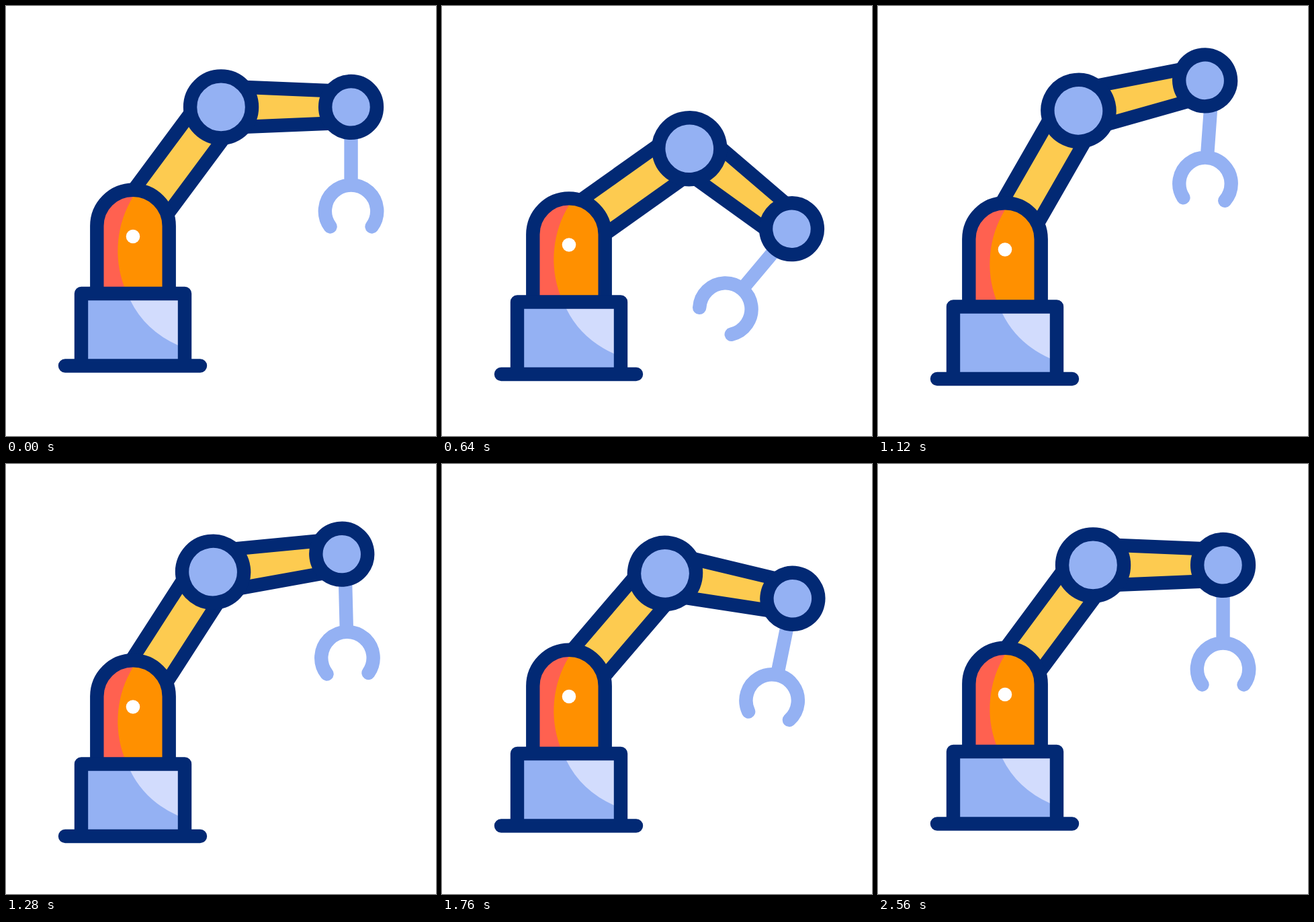
Animation, 640 px wide and 640 px high, one loop 2640 ms. Source, as an HTML page:

```html
<!DOCTYPE html>
<html lang="en">
<head>
<meta charset="utf-8">
<title>Robot arm</title>
<style>
  html, body { margin: 0; width: 100%; height: 100%; overflow: hidden; background: #fff; }
  svg { display: block; width: 100%; height: 100%; }
  .line { stroke: #022974; stroke-width: 20.4; stroke-linejoin: round; stroke-linecap: round; }
  .blue { fill: #94b1f3; }
  .yellow { fill: #fdcb50; }
  .claw { fill: none; stroke: #94b1f3; stroke-width: 20.4; stroke-linecap: round; }
</style>
</head>
<body>
<svg viewBox="0 0 640 640">
  <g id="robot">
    <!-- upper arm: origin at the shoulder, pointing up -->
    <g id="upper">
      <path class="line yellow" d="M-31 0V-219.9H31V0Z"/>
      <!-- forearm: origin at the elbow, pointing right -->
      <g id="fore">
        <g id="claw">
          <path class="claw" d="M0 0V115.5M-31 178A38.7 38.7 0 1 1 31 178"/>
        </g>
        <path class="line yellow" d="M0 -31L193.5 -23V23L0 31Z"/>
        <circle class="line blue" r="46"/>
        <circle class="line blue" cx="193.5" r="38.4"/>
      </g>
    </g>
    <path fill="#ff9000" d="M135.3 428V327.5A53.7 53.7 0 0 1 242.7 327.5V428Z"/>
    <path fill="#ff6150" d="M135.3 428V327.5A53.7 53.7 0 0 1 189 273.8V284A154 154 0 0 0 176 418V428Z"/>
    <path class="line" fill="none" d="M135.3 428V327.5A53.7 53.7 0 0 1 242.7 327.5V428"/>
    <circle cx="189" cy="343" r="10.3" fill="#fff"/>
    <path class="blue" d="M112 428H266V535.5H112Z"/>
    <path fill="#d2dcfd" d="M180 428L185 438Q207 483 256 505L266 509V428Z"/>
    <path class="line" fill="none" d="M112 535.5V428H266V535.5M88 535.5H289"/>
  </g>
</svg>
<script>
  const LOOP = 2640, STEP = 40;
  const SHOULDER = [189, 327], UPPER = 219.9, REST = 36.58;
  const WRIST = 193.5, CLAW_PIVOT = 38;

  const ease = s => s * s * (3 - 2 * s);

  // Eased swing from one turning point [time, value] to the next; starts at rest.
  const swing = (begin, ...turns) => t => {
    let t0 = begin, v0 = 0;
    for (const [t1, v1] of turns) {
      if (t < t1) return v0 + (v1 - v0) * ease(Math.max(0, (t - t0) / (t1 - t0)));
      t0 = t1;
      v0 = v1;
    }
    return v0;
  };

  // The base sinks and rises once; each joint swings a little after the one before it.
  const drop = swing(120, [990, 19.5], [1175, 19.5], [1950, 0]);
  const upperTurn = swing(40, [482, 20], [538, 20], [1156, -7], [1595, 9.5], [1893, 0]);
  const foreTurn = swing(266, [703, 21.3], [1021, -7.2], [1930, 8.6], [2400, 0]);
  const clawTurn = swing(530, [1080, 18.2], [1514, -8.5], [1760, 0.4], [2000, 0]);

  const place = (id, value) => document.getElementById(id).setAttribute("transform", value);

  function draw(ms) {
    const t = Math.floor((ms % LOOP) / STEP) * STEP;
    place("robot", `translate(0 ${drop(t)})`);
    place("upper", `translate(${SHOULDER}) rotate(${REST + upperTurn(t)})`);
    place("fore", `translate(0 ${-UPPER}) rotate(${foreTurn(t) - REST})`);
    place("claw", `translate(${WRIST} 0) rotate(${clawTurn(t)} 0 ${CLAW_PIVOT})`);
  }

  const start = performance.now();
  function tick() {
    draw(performance.now() - start);
    requestAnimationFrame(tick);
  }
  draw(0);
  requestAnimationFrame(tick);
</script>
</body>
</html>
```
